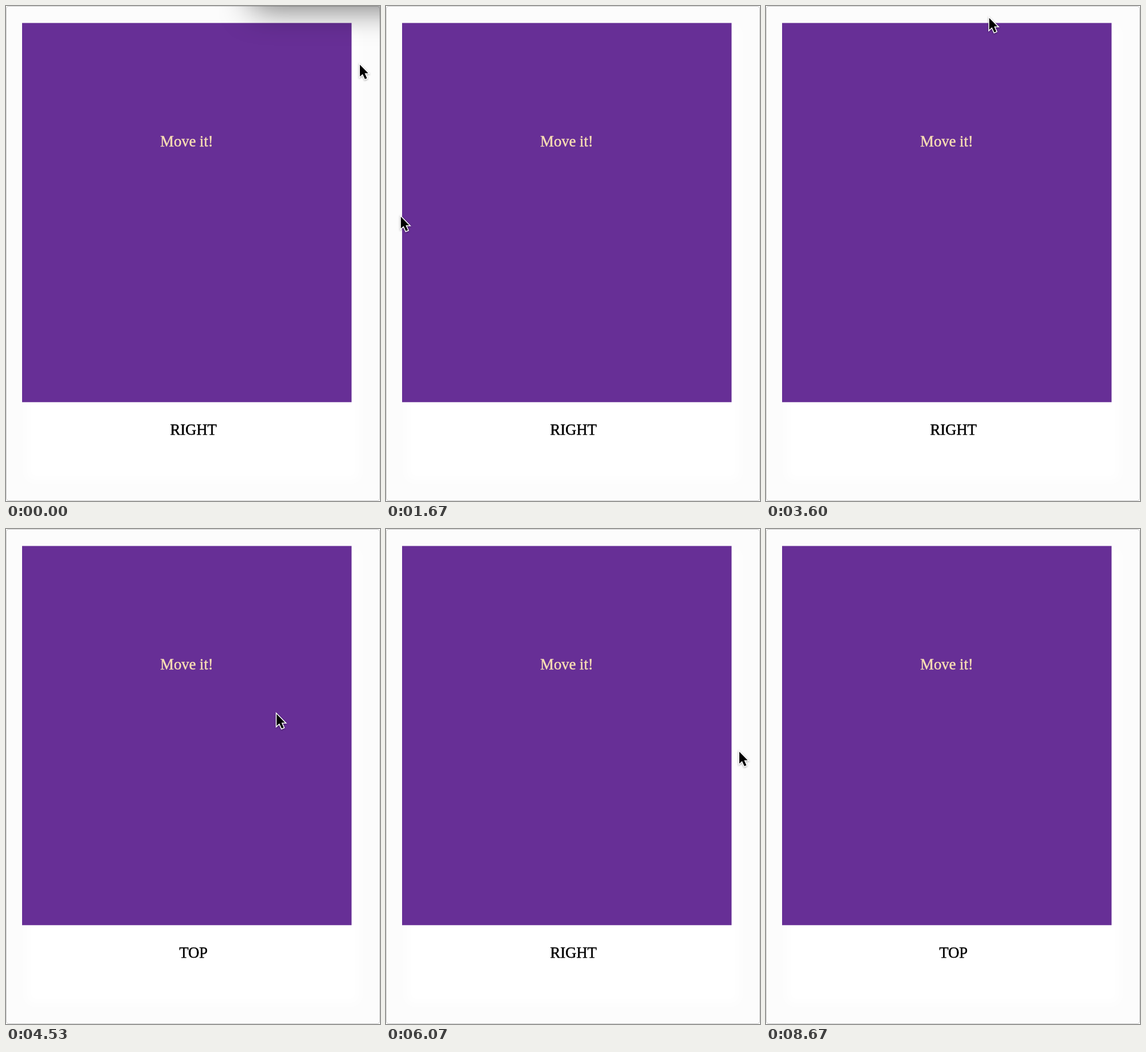
Write an HTML page that moves like this. It is 651 px wide and 860 px high and loops after 8740 ms.

```html
<!DOCTYPE html>
<html lang="en">
<head>
<meta charset="utf-8">
<title>Move it!</title>
<style>
  html, body { margin: 0; width: 100%; height: 100%; overflow: hidden; background: #fff; }
  .stage { position: relative; width: 651px; height: 860px; overflow: hidden; }
  .page {
    position: absolute; inset: 0; box-sizing: border-box;
    border: 1px solid #cbcbcb; border-radius: 5px;
    box-shadow: inset 0 0 20px 35px #fcfcfc;
  }
  .shade {
    position: absolute; left: 428px; top: -200px; width: 500px; height: 204px;
    background: rgba(0, 0, 0, .56); filter: blur(28px);
  }
  svg { position: absolute; left: 0; top: 0; }
  text {
    font: 26.5px "Liberation Serif", "Times New Roman", serif;
    text-anchor: middle; stroke-width: .5px;
  }
  .prompt { fill: #f8deb4; stroke: #f8deb4; }
  .side { fill: #000; stroke: #000; }
  .cursor path {
    stroke: #fff; stroke-width: 3px; paint-order: stroke;
    filter: drop-shadow(0 1.5px 1.5px rgba(0, 0, 0, .35));
  }
</style>
</head>
<body>
<div class="stage">
  <div class="page"></div>
  <svg width="651" height="860">
    <rect x="28" y="29.5" width="573.5" height="658.8" fill="#672f96"/>
    <text class="prompt" x="314.6" y="244.3">Move it!</text>
    <text class="side" x="326.3" y="745">RIGHT</text>
  </svg>
  <div class="shade"></div>
  <svg width="651" height="860">
    <g class="cursor"><path d="M0 0V20.5L4.8 16.2 8.8 25 12.3 23.5 8.4 14.8H14.5Z"/></g>
  </svg>
</div>
<script>
const LOOP = 8740, TICKS = 131, TICK = 1000 / 15;
const SHADE_TICKS = 4;
const box = { left: 28, top: 29.5, right: 601.5, bottom: 688.3 };
const start = { x: 616, y: 102 };

// Each stroke eases from the previous end point; bow bends it sideways.
const strokes = [
  { from: 700, to: 1770, x: 10, y: 369, bow: 50 },
  { from: 1770, to: 2730, x: 613, y: 341, bow: 0 },
  { from: 2730, to: 3700, x: 386, y: 11, bow: -45 },
  { from: 4210, to: 4945, x: 474, y: 768, bow: 51 },
  { from: 4945, to: 6000, x: 615, y: 387, bow: 0 },
  { from: 6070, to: 6830, x: 3, y: 455, bow: 0 },
  { from: 6830, to: 8130, x: 385, y: -40, bow: 80 }
];

const cursor = document.querySelector(".cursor");
const side = document.querySelector(".side");
const shade = document.querySelector(".shade");

function pointer(time) {
  let a = start;
  for (const b of strokes) {
    if (time < b.to) {
      const u = Math.max(0, (time - b.from) / (b.to - b.from));
      const f = u * u * (3 - 2 * u);
      const dx = b.x - a.x, dy = b.y - a.y;
      const bend = b.bow * Math.sin(Math.PI * f);
      const flat = Math.abs(dx) > Math.abs(dy);
      return {
        x: a.x + dx * f + (flat ? 0 : bend),
        y: a.y + dy * f + (flat ? bend : 0)
      };
    }
    a = b;
  }
  return a;
}

function outsideSide({ x, y }) {
  if (x < box.left) return "LEFT";
  if (x > box.right) return "RIGHT";
  if (y < box.top) return "TOP";
  if (y > box.bottom) return "BOTTOM";
}

// The label names the last edge crossed, one tick late.
const labels = ["RIGHT"];
for (let tick = 1; tick < TICKS; tick++) {
  labels[tick] = outsideSide(pointer((tick - 1) * TICK)) || labels[tick - 1];
}

function draw(now) {
  // Frame times are rounded to 10 ms, so a tick may begin slightly early.
  const tick = Math.min(TICKS - 1, Math.floor((now % LOOP + 3.4) / TICK));
  const { x, y } = pointer(tick * TICK);

  cursor.setAttribute("transform", `translate(${x} ${y})`);
  if (side.textContent !== labels[tick]) side.textContent = labels[tick];
  shade.style.opacity = Math.max(0, 1 - tick / SHADE_TICKS);
}

const started = performance.now();
function play() {
  draw(performance.now() - started);
  requestAnimationFrame(play);
}
play();
</script>
</body>
</html>
```
